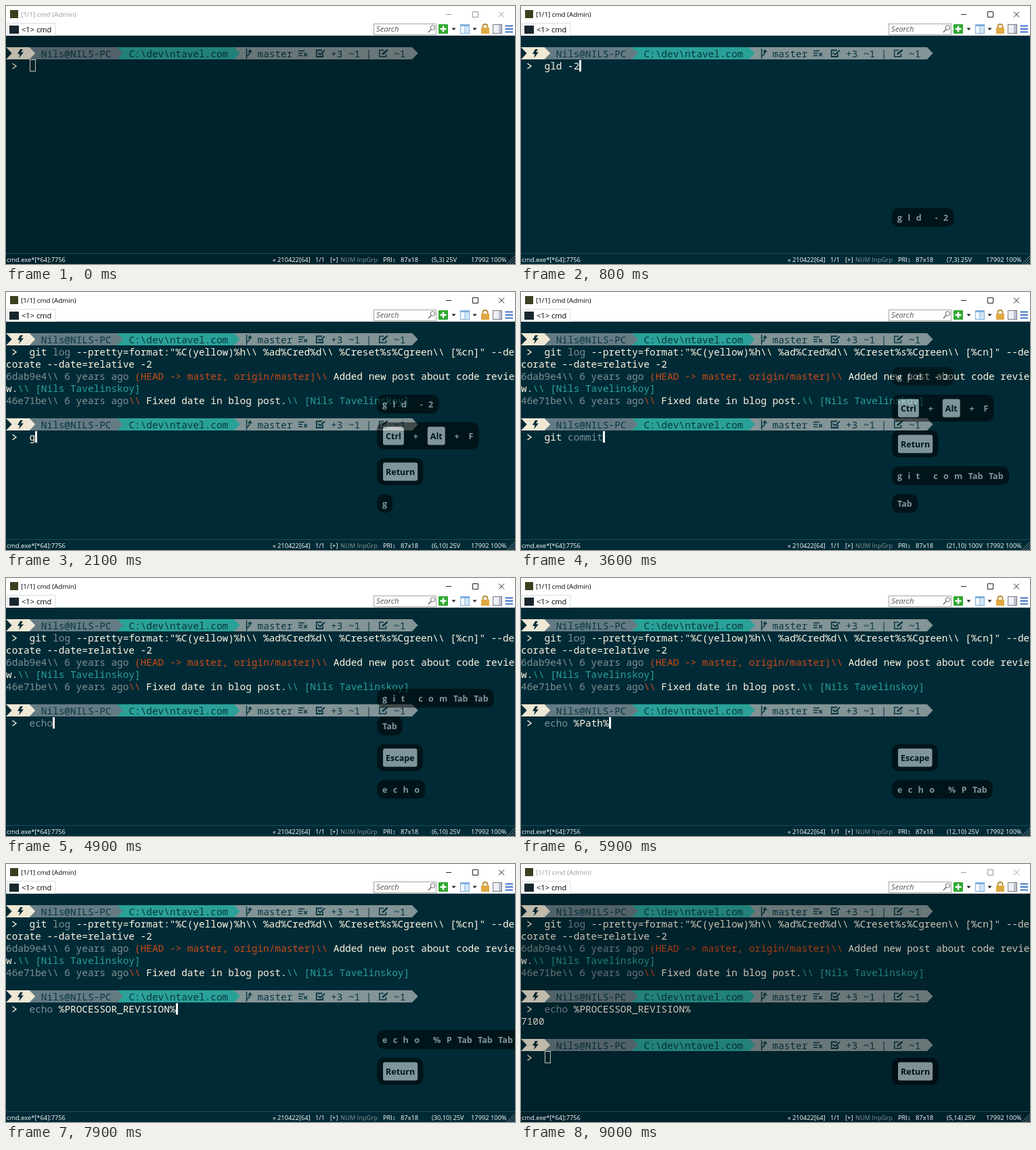
Animation of 752 by 382 pixels, one loop 9100 ms. Source, as an HTML page:

```html
<!DOCTYPE html>
<html>
<head>
<meta charset="utf-8">
<style>
html, body { margin: 0; width: 752px; height: 382px; overflow: hidden; background: #002b36; }
svg { display: block; }
text { white-space: pre; }
.mono { font: 14.4px "Noto Sans Mono", "DejaVu Sans Mono", monospace; }
.ui { font-family: "Open Sans", "Noto Sans", sans-serif; }
.key { font: 700 12.5px "Open Sans", "Noto Sans", sans-serif; }
</style>
</head>
<body>
<svg id="stage" width="752" height="382" viewBox="0 0 752 382"></svg>
<script>
const LOOP = 9100, STEP = 100;
const COL = 8.64, ROW = 18, TOP = 44;
const BG = '#002b36', CREAM = '#fdf6e3', GREY = '#7f9195', SLATE = '#657b83',
  SILVER = '#839496', TEAL = '#2aa198', ORANGE = '#cb4b16', INK = '#073642';
const USER = 'Nils Tavelinskoy';
const ACTIVE = [100, 8600];
const RETURN_1 = 1300, DONE_1 = 1900, RETURN_2 = 7900, DONE_2 = 8000;
const GIT_LOG = ' --pretty=format:"%C(yellow)%h\\\\ %ad%Cred%d\\\\ %Creset%s%Cgreen\\\\ [%cn]" --decorate --date=relative -2';

// What stands on the current input line, by time.
const typed = [
  [0, ''], [200, 'g'], [300, 'gl'], [500, 'gld'], [600, 'gld '], [700, 'gld -'], [800, 'gld -2'],
  [1100, 'git log' + GIT_LOG], [DONE_1, ''],
  [2100, 'g'], [2200, 'gi'], [2300, 'git'], [2400, 'git '], [2500, 'git c'], [2600, 'git co'],
  [2700, 'git com'], [2900, 'git commit '], [3400, 'git commit-tree '], [3600, 'git commit'],
  [4300, ''], [4500, 'e'], [4600, 'ec'], [4700, 'ech'], [4800, 'echo'], [5000, 'echo '],
  [5500, 'echo %'], [5700, 'echo %P'], [5900, 'echo %Path%'], [6400, 'echo %PATHEXT%'],
  [6600, 'echo %PROCESSOR_ARCHITECTURE%'], [6800, 'echo %PROCESSOR_IDENTIFIER%'],
  [7200, 'echo %PROCESSOR_LEVEL%'], [7400, 'echo %PROCESSOR_REVISION%'], [DONE_2, '']
];
const cursorInfo = [
  [0, '(5,3) 25V'], [400, '(7,3) 25V'], [900, '(11,3) 25V'], [1400, '(1,5) 25V'], [DONE_1, '(5,10) 25V'],
  [2100, '(6,10) 25V'], [2500, '(9,10) 25V'], [3100, '(16,10) 25V'], [3500, '(21,10) 100V'],
  [4300, '(5,10) 25V'], [4500, '(6,10) 25V'], [5000, '(10,10) 25V'], [5800, '(12,10) 25V'],
  [6500, '(19,10) 25V'], [6700, '(34,10) 25V'], [6900, '(32,10) 25V'], [7300, '(27,10) 25V'],
  [7500, '(30,10) 25V'], [8100, '(5,14) 25V']
];
const blinkOff = [[3100, 3200], [5200, 5400], [6100, 6300], [6900, 7100], [7600, 7800]];

// Key overlay: labels with their press times, then the fade interval.
const strokes = (labels, times) => labels.map((label, i) => ({ label, at: times[i] }));
const chord = (labels, at) => labels.map(label => ({ label, at, cap: label.length > 1 }));
const keyGroups = [
  { keys: strokes([...'gld -2'], [200, 300, 500, 600, 700, 800]), fade: [3500, 4100] },
  { keys: chord(['Ctrl', '+', 'Alt', '+', 'F'], 1000), fade: [3700, 4200] },
  { keys: chord(['Return'], RETURN_1), fade: [4200, 4600] },
  { keys: strokes([...'git com', 'Tab', 'Tab'], [2100, 2200, 2300, 2400, 2500, 2600, 2700, 2900, 3400]), fade: [5300, 5900] },
  { keys: strokes(['Tab'], [3500]), fade: [5300, 5900] },
  { keys: chord(['Escape'], 4300), fade: [6200, 6800] },
  { keys: strokes([...'echo %P', ...Array(6).fill('Tab')],
      [4500, 4600, 4700, 4800, 5000, 5500, 5700, 5900, 6400, 6600, 6800, 7200, 7400]), fade: [8200, 8800] },
  { keys: chord(['Return'], RETURN_2), fade: [LOOP, LOOP + 500] }
];

const stage = document.getElementById('stage');
const pen = document.createElement('canvas').getContext('2d');
const within = (t, [a, b]) => t >= a && t < b;
const latest = (list, t) => list.filter(e => e[0] <= t).pop()[1];
const esc = s => s.replace(/&/g, '&amp;').replace(/</g, '&lt;').replace(/>/g, '&gt;');
const rect = (x, y, w, h, fill, more = '') => `<rect x="${x}" y="${y}" width="${w}" height="${h}" fill="${fill}" ${more}/>`;
const shape = (d, fill) => `<path d="${d}" fill="${fill}"/>`;
const line = (d, stroke, width = 1) => `<path d="${d}" fill="none" stroke="${stroke}" stroke-width="${width}"/>`;
const label = (x, y, s, size, fill, more = '') =>
  `<text class="ui" x="${x}" y="${y}" font-size="${size}" fill="${fill}" ${more}>${esc(s)}</text>`;
const mono = (x, y, s, fill) => `<text class="mono" x="${x}" y="${y}" fill="${fill}">${esc(s)}</text>`;

// Coloured runs that wrap at the 87th column.
function runs(col, row, parts) {
  let out = '';
  for (let [s, color] of parts) {
    while (s) {
      const piece = s.slice(0, 87 - col);
      out += mono(col * COL, TOP + row * ROW + 14, piece, color);
      s = s.slice(piece.length);
      col += piece.length;
      if (col >= 87) { col = 0; row++; }
    }
  }
  return out;
}

function commandParts(s) {
  if (s.startsWith('echo')) return [['echo', GREY], [s.slice(4), CREAM]];
  const m = s.match(/^(git )(log|commit(?:-tree)?)(.*)$/);
  return m ? [[m[1], CREAM], [m[2], GREY], [m[3], CREAM]] : [[s, CREAM]];
}

function prompt(row) {
  const y = TOP + row * ROW - 1, mid = y + 9, base = y + 15;
  const arrow = (x, from, fill) =>
    shape(`M${from} ${y}H${x}L${x + 8.6} ${mid}L${x} ${y + 18}H${from}Z`, fill);
  let s = arrow(600, 337, SILVER) + arrow(337, 164, TEAL) + arrow(164, 34, SLATE) + arrow(34.6, 0, '#eee8d5');
  s += shape(`M0 ${y}L8.6 ${mid}L0 ${y + 18}Z`, BG);
  s += shape(`M21 ${y + 3}L17 ${y + 10}H20.5L19 ${y + 16}L26 ${y + 7.5}H22L25 ${y + 3}Z`, BG);
  s += mono(6 * COL, base, 'Nils@NILS-PC', INK) + mono(21 * COL, base, 'C:\\dev\\ntavel.com', INK);
  s += line(`M355.5 ${y + 2}V${y + 17}M355.5 ${y + 13}Q360.5 ${y + 11} 360.5 ${y + 6}M358 ${y + 7.5}L360.5 ${y + 4}L363 ${y + 7.5}`, INK, 1.5);
  s += mono(43 * COL, base, 'master', INK);
  s += line(`M432 ${y + 5.5}H441M432 ${y + 9}H438M432 ${y + 12.5}H438M440 ${y + 8.5}L445 ${y + 13.5}M445 ${y + 8.5}L440 ${y + 13.5}`, INK, 1.4);
  s += line(`M468 ${y + 9.5}V${y + 14}H458.7V${y + 4.5}H467M461 ${y + 8}L464 ${y + 11}L471 ${y + 4.5}`, INK, 1.8);
  s += mono(480, base, '+3 ~1 |', INK);
  s += line(`M561.5 ${y + 10}V${y + 14}H551.7V${y + 4.5}H558M556 ${y + 10.5}L564 ${y + 3.5}`, INK, 1.5);
  s += line(`M556 ${y + 10.5}L563 ${y + 4.5}`, INK, 2.6);
  s += mono(573, base, '~1', INK);
  return s + line(`M9.5 ${y + 24}L15 ${y + 28}L9.5 ${y + 32}`, CREAM, 1.4);
}

function terminal(t, active) {
  const afterLog = t >= DONE_1, afterEcho = t >= DONE_2;
  const row = afterEcho ? 13 : afterLog ? 9 : 2;
  const text = latest(typed, t);
  let s = rect(0, 44, 752, 338, BG) + prompt(1);
  if (afterLog) {
    s += runs(4, 2, commandParts('git log' + GIT_LOG));
    s += runs(0, 4, [['6dab9e4\\\\ 6 years ago ', GREY], ['(HEAD -> master, origin/master)\\\\', ORANGE],
      [' Added new post about code review.', CREAM], [`\\\\ [${USER}]`, TEAL]]);
    s += runs(0, 6, [['46e71be\\\\ 6 years ago', GREY], ['\\\\', ORANGE],
      [' Fixed date in blog post.', CREAM], [`\\\\ [${USER}]`, TEAL]]);
    s += prompt(8);
  }
  if (afterEcho) {
    s += runs(4, 9, commandParts('echo %PROCESSOR_REVISION%')) + runs(0, 10, [['7100', CREAM]]) + prompt(12);
  }
  s += runs(4, row, commandParts(text));
  const running = within(t, [RETURN_1, DONE_1]);
  const cells = running ? 0 : 4 + text.length;
  const x = Math.round((cells % 87) * COL), y = TOP + (running ? 4 : row + Math.floor(cells / 87)) * ROW;
  if (!active) s += `<rect x="${x + .5}" y="${y - .5}" width="8" height="17" fill="none" stroke="${CREAM}"/>`;
  else if (!blinkOff.some(r => within(t, r))) s += rect(x, y, 3, 17, '#fff');
  return active ? s : s + rect(0, 44, 752, 338, '#000', 'opacity=".2"');
}

function statusBar(t) {
  const item = (x, s, fill = '#fff') => label(x, 379, s, 9.3, fill);
  return line('M0 366.5H752', '#1c4a55') + item(1, 'cmd.exe*[*64]:7756') + item(394, '« 210422[64]') +
    item(457, '1/1') + item(479, '[+]') + item(494, 'NUM InpGrp', '#839496') + item(557, 'PRI↕') +
    item(583, '87x18') + item(629, latest(cursorInfo, t)) + item(687, '17992 100%') +
    line('M740 382L752 370M744 382L752 374M748 382L752 378', '#6d858c');
}

function windowFrame(t, active) {
  const running = within(t, [RETURN_1, DONE_1]);
  const command = running ? ' - git  log' + GIT_LOG : '';
  const tab = '<1> cmd' + (running ? ' - git  log --pretty=format:"%C(...' : '');
  const tabEnd = running ? 233 : 73, tone = active ? '#000' : '#999';
  let s = rect(0, 0, 752, 44, '#fff') + rect(6, 6, 12, 12, '#39401f');
  s += label(22, 16, `[1/1] cmd${command} (Admin)`, 9.8, tone);
  s += line('M650 12.5H658M689.5 8.5H697.5V16.5H689.5ZM728 8.5L736 16.5M736 8.5L728 16.5', active ? '#222' : '#999');
  s += line(`M0 43.5H1.5V25.5H${tabEnd}V43.5H752`, '#dadfe2') + rect(5, 29, 14, 12, '#17262e');
  s += label(23, 39, tab, 11.1, '#000');
  s += `<rect x="543.5" y="26.5" width="92" height="16" fill="#fff" stroke="#a5a5a5"/>`;
  s += label(547, 38, 'Search', 11.3, '#555', 'font-style="italic"');
  s += `<circle cx="630.5" cy="32" r="3.3" fill="none" stroke="#666"/>` + line('M628 34.5L624 39', '#666', 1.5);
  s += rect(639, 27, 14, 14, '#2da82f', 'rx="1"') + line('M646 29.5V38.5M641.5 34H650.5', '#fff', 2.6);
  s += shape('M658.5 32.5H664.5L661.5 36ZM689.5 32.5H695.5L692.5 36Z', '#222');
  s += rect(671, 27, 14, 14, '#7fb0de') + rect(672, 30, 5.5, 10, '#f4f9fe') + rect(678.5, 30, 5.5, 10, '#d3e6f7');
  s += line('M704.5 33V30.5Q704.5 27 708 27T711.5 30.5V33', '#b58b35', 1.8) + rect(702, 32, 12, 9, '#dfa93f');
  s += `<rect x="719.5" y="27.5" width="13" height="13" fill="#eef0f5" stroke="#777b85"/>` + rect(728, 28, 4, 12, '#b9bfcd');
  return s + line('M737.5 29.5H749M737.5 34H749M737.5 38.5H749', '#3f74c6', 2);
}

function keyOverlay(t) {
  const gap = 8.4;
  let s = '', bottom = 327;
  pen.font = '700 12.5px "Open Sans", "Noto Sans", sans-serif';
  for (const { keys, fade } of [...keyGroups].reverse()) {
    const shown = keys.filter(k => k.at <= t);
    if (!shown.length || t >= fade[1]) continue;
    const tall = keys[0].cap, height = tall ? 40 : 28, mid = bottom - height / 2;
    let x = tall ? 557 : 556, inner = '';
    for (const { label: name, cap } of shown) {
      const width = pen.measureText(name).width, joint = name === '+' ? 5.5 : 0, pad = cap ? 4 : 0;
      x += joint;
      if (cap) inner += rect(x, mid - 13.5, width + 2 * pad, 27, '#fff', 'rx="3"');
      inner += `<text class="key" x="${x + pad}" y="${mid + 4.5}" fill="${cap ? '#000' : '#fff'}">${esc(name)}</text>`;
      x += width + 2 * pad + joint + gap;
    }
    const alpha = .5 * Math.min(1, (fade[1] - t) / (fade[1] - fade[0]));
    s += `<g opacity="${alpha}">` + rect(548, bottom - height, x - 548, height, '#000', 'rx="10"') + inner + '</g>';
    bottom -= height + 13;
  }
  return s;
}

let drawn = -1;
function draw(now) {
  const t = Math.floor(now % LOOP / STEP) * STEP;
  if (t !== drawn) {
    const active = within(t, ACTIVE);
    stage.innerHTML = terminal(t, active) + statusBar(t) + windowFrame(t, active) + keyOverlay(t);
    drawn = t;
  }
}

const start = performance.now();
function tick() {
  draw(performance.now() - start);
  requestAnimationFrame(tick);
}
tick();
</script>
</body>
</html>
```
